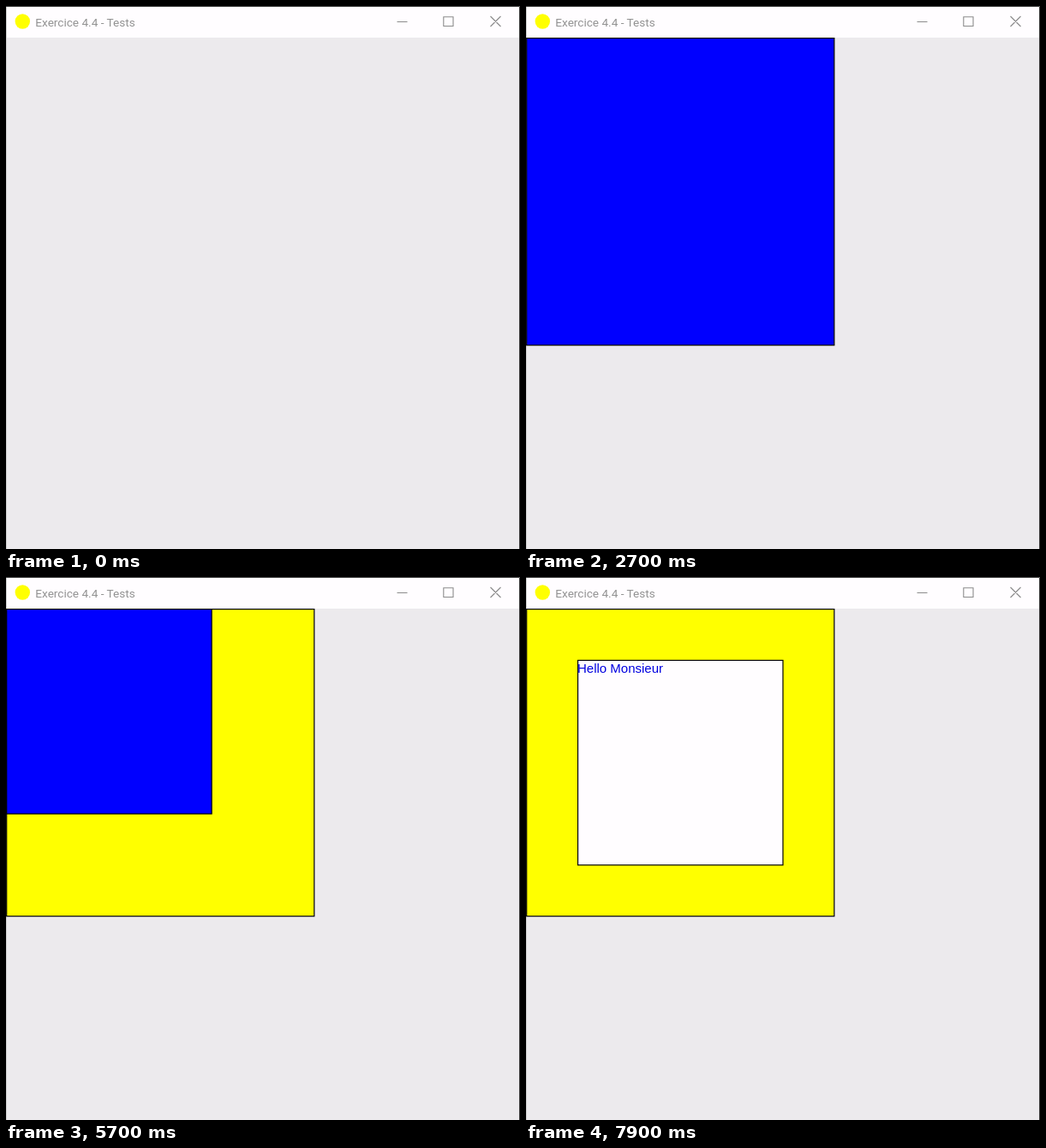
Animation, 600 px wide and 635 px high, one loop 8000 ms. Source, as an HTML page:

```html
<!DOCTYPE html>
<html lang="fr">
<head>
<meta charset="utf-8">
<style>
  html, body { margin: 0; width: 100%; height: 100%; overflow: hidden; background: #eceaed; }
  svg { display: block; width: 600px; height: 635px; }
  .title { font: 13.6px Roboto, sans-serif; fill: #929292; }
  .label { font: 15px "Liberation Sans", Arial, sans-serif; fill: #0000e0; }
  .controls { fill: none; stroke: #8c8c8c; stroke-width: 1.1; }
  .square { stroke: #000; stroke-width: 1.2; }
</style>
</head>
<body>
<svg viewBox="0 0 600 635">
  <rect width="600" height="635" fill="#eceaed"/>
  <rect width="600" height="37" fill="#fffdff"/>
  <path d="M.5 1V635" stroke="#cfcfd0"/>
  <path d="M0 .5H599.5V635" fill="none" stroke="#383838"/>
  <circle cx="19.3" cy="18" r="8.7" fill="#ff0"/>
  <text class="title" x="34.3" y="23.7">Exercice 4.4 - Tests</text>
  <path class="controls" d="M456.5 18.5H468.5M510.8 12.7H522V23.5H510.8ZM565.5 12L577.5 24M577.5 12L565.5 24"/>
  <rect class="square" id="outer"/>
  <rect class="square" id="inner"/>
  <text class="label" id="label" x="60" y="112.4">Hello Monsieur</text>
</svg>
<script>
const LOOP = 8000;
const LABEL_START = 7700;
const ORIGIN = { x: 0.7, y: 37.6 };
const UNIT = 1.197; // stage pixels per canvas unit

// Each step: start time, offset from the canvas corner, side length, fill.
const squares = {
  outer: [
    [800, 0, 20, '#00f'],
    [1800, 0, 300, '#00f'],
    [2800, 0, 300, '#ff0']
  ],
  inner: [
    [4700, 0, 20, '#00f'],
    [5700, 0, 200, '#00f'],
    [6800, 50, 200, '#fffdff']
  ]
};

const byId = id => document.getElementById(id);
const show = (element, visible) => element.setAttribute('visibility', visible ? 'visible' : 'hidden');

function drawSquare(id, time) {
  const element = byId(id);
  const step = squares[id].filter(([start]) => start <= time).pop();
  show(element, step);
  if (!step) return;
  const [, offset, side, fill] = step;
  const attributes = {
    x: ORIGIN.x + offset * UNIT,
    y: ORIGIN.y + offset * UNIT,
    width: side * UNIT,
    height: side * UNIT,
    fill
  };
  for (const name in attributes) element.setAttribute(name, attributes[name]);
}

function draw() {
  const time = performance.now() % LOOP;
  drawSquare('outer', time);
  drawSquare('inner', time);
  show(byId('label'), time >= LABEL_START);
  requestAnimationFrame(draw);
}
draw();
</script>
</body>
</html>
```
